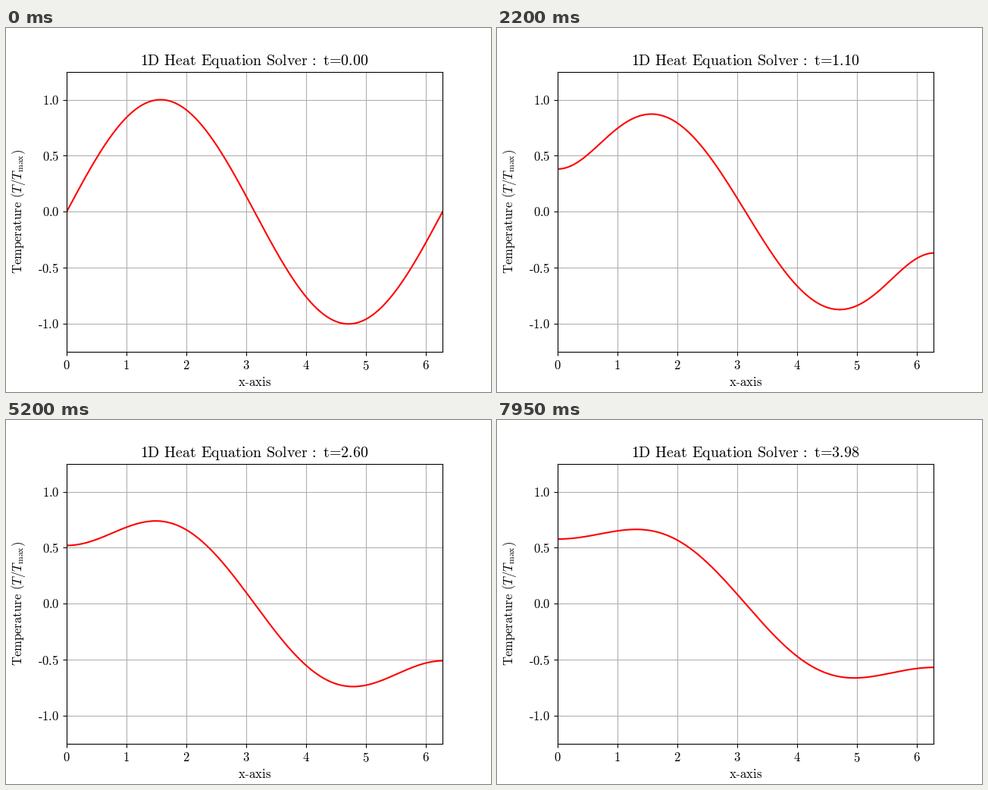
A matplotlib script for the animation above (8 s loop, 640 px wide and 480 px high).

```python
import numpy as np
import matplotlib.pyplot as plt
from matplotlib.animation import FuncAnimation
from matplotlib.ticker import FuncFormatter, MultipleLocator

W, H, DPI = 640, 480, 100
FRAMES, INTERVAL = 160, 50
DT = 0.025
DIFFUSIVITY = 0.125
LENGTH = 2 * np.pi + 0.0175   # insulated wall sits half a cell past the last node
SPACE = r"\hspace{0.38}"
WIDE_SPACE = r"\hspace{0.506}"

plt.rcParams.update({
    "font.family": "Liberation Serif",
    "font.size": 12,
    "mathtext.fontset": "cm",
})


def roman(text):
    return r"\text{%s}" % text


def tick_text(spec):
    return FuncFormatter(lambda v, _: "$" + roman(format(v, spec)) + "$")


def title_text(t):
    words = ["1D", "Heat", "Equation", "Solver", ":"]
    head = SPACE.join(roman(w) for w in words)
    return "$" + head + WIDE_SPACE + roman(f"t={t:.2f}") + "$"


# Cosine series of sin(x) between two insulated walls
x = np.linspace(0, 2 * np.pi, 401)
k = np.arange(3000) * np.pi / LENGTH
coef = ((1 - np.cos((1 + k) * LENGTH)) / (1 + k)
        + (1 - np.cos((1 - k) * LENGTH)) / (1 - k)) / LENGTH
coef[0] /= 2
modes = np.cos(np.outer(x, k))


def temperature(t):
    if t == 0:
        return np.sin(x)
    return modes @ (coef * np.exp(-DIFFUSIVITY * k**2 * t))


fig = plt.figure(figsize=(W / DPI, H / DPI), dpi=DPI, facecolor="white")
ax = fig.add_axes([0.125, 0.11, 0.775, 0.77])
ax.set_xlim(0, 2 * np.pi)
ax.set_ylim(-1.25, 1.25)
ax.xaxis.set_major_locator(MultipleLocator(1))
ax.yaxis.set_major_locator(MultipleLocator(0.5))
ax.xaxis.set_major_formatter(tick_text(".0f"))
ax.yaxis.set_major_formatter(tick_text(".1f"))
ax.tick_params(axis="x", pad=4.2)
ax.grid(True)

fig.text(328 / W, 1 - 472 / H, "$" + roman("x") + "$-$" + roman("axis") + "$",
         ha="center", va="baseline")
fig.text(21 / W, 1 - 242 / H,
         "$" + roman("Temperature") + SPACE + r"(T/T_{\mathrm{max}})$",
         ha="center", va="baseline", rotation=90, rotation_mode="anchor")

title = ax.set_title(title_text(0))
line, = ax.plot(x, temperature(0), color="red", lw=1.5)


def update(i):
    t = i * DT
    line.set_ydata(temperature(t))
    title.set_text(title_text(t))
    return line, title


anim = FuncAnimation(fig, update, frames=FRAMES, interval=INTERVAL,
                     repeat=True, repeat_delay=0, blit=False)
plt.show()
```
